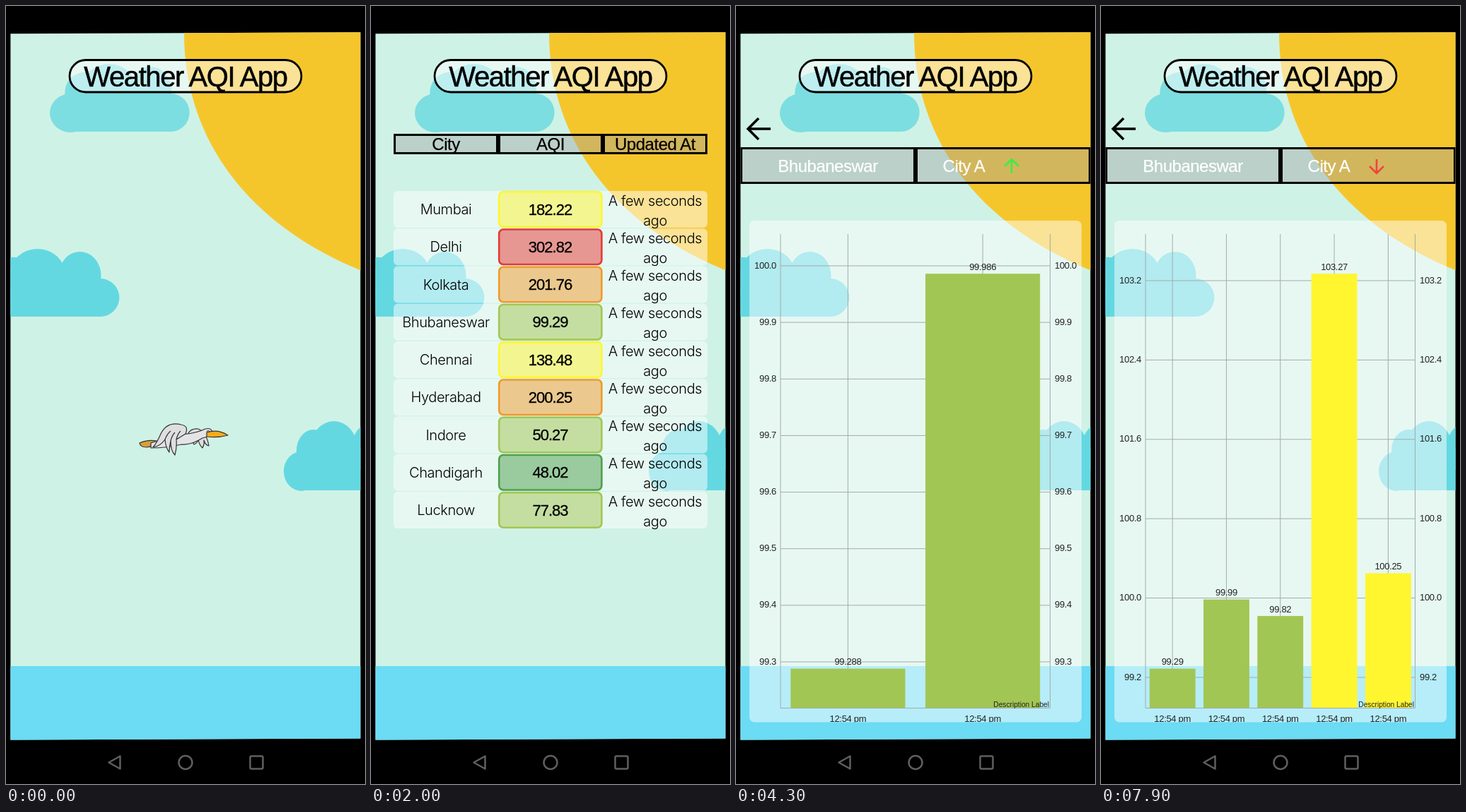
Recreate the animation shown at these times as an HTML page. Size 508 by 1102 pixels, loop 8000 ms.

```html
<!DOCTYPE html>
<html lang="en">
<head>
<meta charset="utf-8">
<title>Weather AQI App</title>
<style>
  html, body { margin: 0; width: 100%; height: 100%; overflow: hidden; background: #000; }
  svg { display: block; width: 508px; height: 1102px; }
  text { font-family: "Liberation Sans", Arial, sans-serif; text-anchor: middle; }
  .title { font-size: 40px; letter-spacing: -.035em; stroke: #000; stroke-width: .5; }
  .head { font-size: 24px; letter-spacing: -.02em; stroke: #000; stroke-width: .25; }
  .value { font-size: 22px; letter-spacing: -.045em; stroke: #000; stroke-width: .3; }
  .light { font-family: Inter, sans-serif; font-weight: 300; font-size: 20px; letter-spacing: -.02em; }
  .tick { font-size: 13px; letter-spacing: -.025em; fill: #222; }
  .note { font-size: 10.2px; fill: #222; }
  .start { text-anchor: start; }
  .end { text-anchor: end; }
  .white { fill: #fff; stroke: #fff; }
  .cell { fill: #a0a0a0; fill-opacity: .42; stroke: #000; stroke-width: 3; }
  .veil { fill: #fff; fill-opacity: .5; }
  .grid { fill: none; stroke: #a3abaa; stroke-width: 1; }
  .nav { fill: none; stroke: #5f5f5f; stroke-width: 2.5; stroke-linejoin: round; }
  #bird path { stroke: #333; stroke-width: 1.2; stroke-linejoin: round; }
</style>
</head>
<body>
<svg viewBox="0 0 508 1102">
  <defs>
    <clipPath id="screen"><path d="M6.400 39.200L501.500 37.200V1037.400L6.400 1039.400Z"/></clipPath>
    <clipPath id="panel"><rect x="19" y="304" width="470" height="710.5"/></clipPath>
    <g id="cloud">
      <ellipse cx="25" cy="-27" rx="25" ry="28"/>
      <ellipse cx="42" cy="-56" rx="24" ry="30"/>
      <ellipse cx="71" cy="-60" rx="33" ry="38"/>
      <ellipse cx="121" cy="-59" rx="25" ry="35"/>
      <ellipse cx="145" cy="-27.500" rx="22.5" ry="27.500"/>
      <path d="M25 0V-40H40V-60H125V-40H145V0Z"/>
    </g>
  </defs>
  <g clip-path="url(#screen)">
    <rect width="508" height="1102" fill="#cff2e6"/>
    <path d="M252 30V38C252 190 344 310 502 374.500V30Z" fill="#f5c62c"/>
    <g fill="#64d8e1">
      <use href="#cloud" transform="translate(62 178) scale(1.18 .98)" fill="#7cdee1"/>
      <use href="#cloud" transform="translate(-40.6 440) scale(1.2 .98)"/>
      <use href="#cloud" transform="translate(393 686)"/>
    </g>
    <rect y="935" width="508" height="120" fill="#6cdbf4"/>
    <rect class="veil" x="90" y="76.5" width="328" height="45.5" rx="22.7" stroke="#000" stroke-width="2.8"/>
    <text class="title" x="254" y="113.5">Weather AQI App</text>
    <g id="bird"></g>
    <g id="view"></g>
  </g>
  <g class="nav">
    <path d="M145.500 1071.500L161.500 1062.500V1080.500Z"/>
    <circle cx="254" cy="1071.500" r="9.500"/>
    <rect x="345.500" y="1062.500" width="18" height="18" rx="2"/>
  </g>
</svg>
<script>
const LOOP = 8000, FLAP = 640;
const TABLE_AT = 1900, REFRESH_AT = 2600, CHART_AT = 3700;
const BARS_AT = [5000, 6100, 7500];
const YELLOW = '#fff630', RED = '#e53935', ORANGE = '#f09a2c', GREEN = '#a2c653', DEEP = '#4f9f4c';

const bird = document.getElementById('bird');
const view = document.getElementById('view');
const text = (cls, x, y, s) => `<text class="${cls}" x="${x}" y="${y}">${s}</text>`;
const rect = (x, y, w, h, attrs) => `<rect x="${x}" y="${y}" width="${w}" height="${h}" ${attrs}/>`;

// Each bird part: fill, path with lowered wings, path with raised wings
const PARTS = [
  ['#dddcde',
    'M258 605Q262 598 272 599Q284 604 287 623Q282 622 280 615Q281 621 278 626Q273 621 272 614Q271 619 266 621Q262 614 258 605Z',
    'M254 602Q246 583 253 577Q268 571 280 581Q281 583 277 589Q281 591 283 600Q277 599 276 593Q273 597 268 604Q262 602 254 602Z'],
  ['#d6a03c',
    'M189 619Q200 614 213 616Q210 624 199 625Q190 625 189 619Z',
    'M196 624Q214 618 232 618Q228 626 212 627Q197 628 196 624Z'],
  ['#e4e3e5',
    'M205 619Q225 612 245 607Q268 606 282 599Q290 597 292 603Q288 610 278 612Q262 622 248 621Q228 626 205 626Z',
    'M204 618Q222 611 240 602Q262 606 280 600Q289 597 291 603Q287 609 279 612Q262 623 248 621Q232 620 204 624Z'],
  ['#f6ab1b',
    'M284 604Q300 599 314 608Q300 612 284 610Z',
    'M283 604Q299 599 313 608Q299 612 283 610Z'],
  ['#dfdee0',
    'M254 606Q259 595 248 593Q228 588 219 606Q214 618 208 625Q218 624 225 614Q226 626 231 632Q231 624 233 616Q233 630 239 636Q242 626 241 614Q246 611 254 606Z',
    'M253 604Q257 585 245 579Q226 573 215 582Q220 588 217 605Q221 602 224 597Q223 606 228 612Q231 608 232 600Q233 616 239 626Q244 618 243 606Q247 609 253 604Z'],
  ['none',
    'M225 614Q228 606 233 602M233 616Q235 608 239 604M241 614Q243 606 247 602M284 603Q286 600 288 603',
    'M224 597Q224 588 228 584M232 600Q233 590 237 587M243 606Q241 596 245 590M283 603Q285 600 287 603']
];

function mix(a, b, k) {
  const goal = b.match(/\d+/g);
  let i = 0;
  return a.replace(/\d+/g, n => (+n + (goal[i++] - n) * k).toFixed(1) + ' ');
}

function drawBird(t) {
  const k = (1 - Math.cos(2 * Math.PI * t / FLAP)) / 2;
  return PARTS.map(([fill, low, high]) => `<path fill="${fill}" d="${mix(low, high, k)}"/>`).join('');
}

// City, colour, first reading, refreshed reading
const CITIES = [
  ['Mumbai', YELLOW, '182.22'],
  ['Delhi', RED, '302.82'],
  ['Kolkata', ORANGE, '201.76'],
  ['Bhubaneswar', GREEN, '99.29', '99.99'],
  ['Chennai', YELLOW, '138.48', '143.84'],
  ['Hyderabad', ORANGE, '200.25'],
  ['Indore', GREEN, '50.27'],
  ['Chandigarh', DEEP, '48.02', '45.85'],
  ['Lucknow', GREEN, '77.83', '78.13'],
  ['Bengaluru', YELLOW, '190.69'],
  ['Pune', ORANGE, '219.26']
];

function drawTable(fresh) {
  const head = ['City', 'AQI', 'Updated At'].map((s, i) =>
    rect(33.5 + 148 * i, 182.5, 145, 26, 'class="cell"') + text('head', 106 + 148 * i, 204, s));
  const rows = CITIES.slice(0, fresh ? 11 : 9).map(([city, color, first, next], i) => {
    const y = 262 + i * 53.25;
    return rect(32, y, 444, 52, 'class="veil" rx="6"')
      + rect(181.2, y + 1.2, 145.2, 49.6, `rx="6" fill="${color}" fill-opacity=".5" stroke="${color}" stroke-width="2.6"`)
      + text('light', 106, y + 33, city)
      + text('value', 253.5, y + 33.5, fresh && next || first)
      + text('light', 402, y + 20.5, 'A few seconds')
      + text('light', 402, y + 48.5, 'ago');
  });
  return head.concat(rows).join('');
}

const READINGS = [99.288, 99.986, 99.819, 103.27, 100.25];

function drawChart(count) {
  const left = 63, right = 444.5, top = 323, bottom = 994.5;
  const wide = count > 3;
  const [base, step, ticks, baseY, scale] = wide ? [99.2, .8, 6, 951, 140.5] : [99.3, .1, 8, 929, 801.4];
  const yOf = v => baseY - (v - base) * scale;
  const slot = (right - left) / count;
  const rising = READINGS[count - 1] > READINGS[count - 2];

  let out = '<path d="M49 174H17M32 159L17 174L32 189" fill="none" stroke="#000" stroke-width="3.6"/>'
    + rect(7.5, 201.5, 245, 49, 'class="cell"') + rect(255.5, 201.5, 245, 49, 'class="cell"')
    + text('head white', 130, 234.5, 'Bhubaneswar') + text('head white', 322.5, 234.5, 'City A')
    + `<path d="M390 217V237M380 227L390 237L400 227" fill="none" stroke-width="2.6" ${rising
      ? 'stroke="#3aee45" transform="matrix(1 0 0 -1 0 454)"' : 'stroke="#f0443c"'}/>`
    + rect(19, 304, 470, 710.5, 'class="veil" rx="7"');

  for (let i = 0; i < ticks; i++) {
    const v = base + step * i, y = yOf(v);
    out += `<path class="grid" d="M${left} ${y}H${right}"/>`
      + text('tick end', 57, y + 3.5, v.toFixed(1)) + text('tick start', 451, y + 3.5, v.toFixed(1));
  }
  let bars = '', labels = '';
  READINGS.slice(0, count).forEach((v, i) => {
    const x = left + slot * (i + .5), y = yOf(v);
    out += `<path class="grid" d="M${x} ${top}V${bottom}"/>`;
    bars += rect(x - slot * .425, y, slot * .85, bottom - y, `fill="${v > 100 ? YELLOW : GREEN}"`);
    labels += text('tick', x, y - 5.5, v.toFixed(wide ? 2 : 3)) + text('tick', x, 1014, '12:54 pm');
  });
  out += bars + `<path class="grid" d="M${left} ${top}V${bottom}H${right}V${top}"/>`
    + `<g clip-path="url(#panel)">${labels}</g>`;
  return out + text('note end', 443, 993, 'Description Label');
}

let shown;
function show(key, draw) {
  if (key === shown) return;
  shown = key;
  view.innerHTML = draw();
}

function tick() {
  const t = performance.now() % LOOP;
  bird.innerHTML = t < TABLE_AT ? drawBird(t) : '';
  if (t < TABLE_AT) {
    show('loading', () => '');
  } else if (t < CHART_AT) {
    const fresh = t >= REFRESH_AT;
    show('table' + fresh, () => drawTable(fresh));
  } else {
    const count = 2 + BARS_AT.filter(at => t >= at).length;
    show('chart' + count, () => drawChart(count));
  }
  requestAnimationFrame(tick);
}
tick();
</script>
</body>
</html>
```
